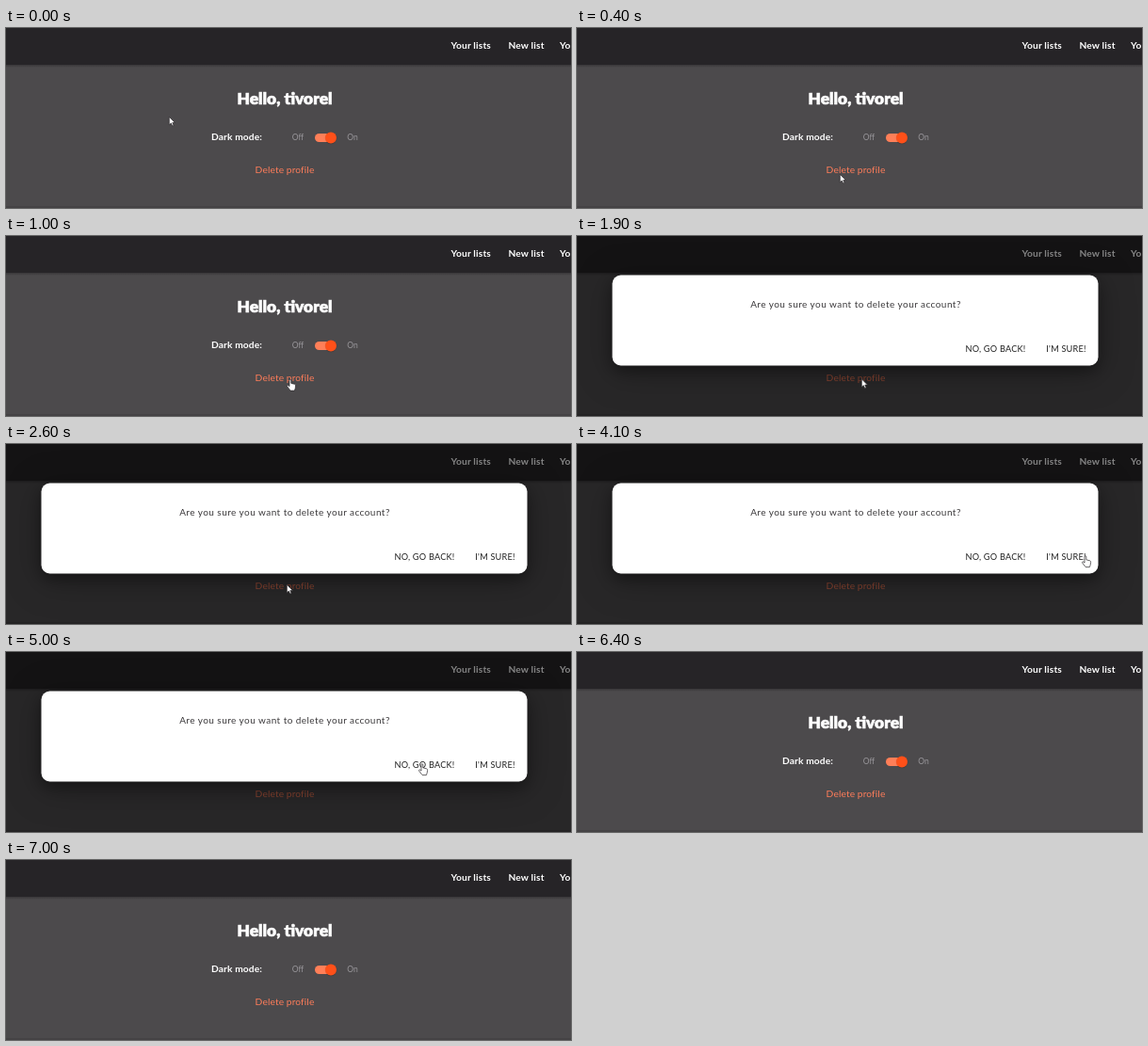
Write an HTML page that moves like this. It is 600x191 px and loops after 7400 ms.

```html
<!DOCTYPE html>
<html lang="en">
<head>
<meta charset="utf-8">
<title>Profile</title>
<style>
  html, body { margin: 0; width: 100%; height: 100%; overflow: hidden; background: #4c4a4c; }
  svg { display: block; width: 600px; height: 191px; }
  text { font: 400 10px Lato, "Open Sans", sans-serif; fill: #fff; }
  .mid { text-anchor: middle; }
  .bold { font-weight: 700; }
  .nav { font-size: 10.2px; letter-spacing: .15px; }
  .title { font-size: 17.4px; font-weight: 900; stroke: #fff; stroke-width: .6px; }
  .label { font-size: 10.2px; letter-spacing: .15px; }
  .state { font-size: 8.5px; fill: #98969a; }
  .delete { font-size: 10.2px; fill: #ff7d5a; letter-spacing: .12px; }
  .card { fill: #fff; filter: drop-shadow(0 6px 8px rgba(0,0,0,.32)) drop-shadow(0 5px 18px rgba(0,0,0,.25)); }
  .ask { fill: #3a383a; letter-spacing: .45px; }
  .button { font-size: 9.2px; fill: #222; letter-spacing: .2px; }
  .pointer { fill: #fff; stroke: #2a282a; stroke-width: .7px; stroke-linejoin: round; }
  .beam { fill: none; stroke: #333; stroke-width: .9px; }
</style>
</head>
<body>
<svg viewBox="0 0 600 191">
  <defs>
    <linearGradient id="fade" x2="0" y2="1">
      <stop stop-color="#262427" stop-opacity=".5"/>
      <stop offset="1" stop-color="#262427" stop-opacity="0"/>
    </linearGradient>
  </defs>
  <rect width="600" height="191" fill="#4c4a4c"/>
  <rect y="189" width="600" height="2" fill="#444244"/>
  <rect width="600" height="39" fill="#262427"/>
  <rect y="39" width="600" height="3" fill="url(#fade)"/>

  <text class="bold nav" x="472.5" y="21.6">Your lists</text>
  <text class="bold nav" x="533.5" y="21.6">New list</text>
  <text class="bold nav" x="588" y="21.6">Yo</text>

  <text class="title mid" x="296" y="81">Hello, tivorel</text>
  <text class="bold label mid" x="245" y="118.8">Dark mode:</text>
  <text class="state mid" x="310" y="119">Off</text>
  <text class="state mid" x="368" y="119">On</text>
  <rect x="328" y="112" width="21" height="9" rx="4.5" fill="#ff7f58"/>
  <circle cx="345" cy="117" r="6.3" opacity=".15"/>
  <circle cx="345" cy="116.5" r="6" fill="#ff5019"/>
  <text class="delete mid" x="296" y="154">Delete profile</text>

  <g id="dialog" visibility="hidden">
    <rect width="600" height="191" opacity=".48"/>
    <rect class="card" x="37.5" y="41.5" width="516" height="96" rx="9"/>
    <text class="ask mid" x="296" y="76">Are you sure you want to delete your account?</text>
    <text class="button mid" x="444.5" y="123">NO, GO BACK!</text>
    <text class="button mid" x="519.5" y="123">I'M SURE!</text>
  </g>

  <g id="cursor">
    <path id="arrow" class="pointer" d="M.3 .3V8.8L2.3 7L3.7 10L5.1 9.4L3.8 6.5H6.5Z"/>
    <path id="hand" class="pointer" d="M3 1.2Q3.9 .2 4.8 1.2V4.8L8.6 5.8Q9.7 6.2 9.6 7.4L9.2 10.2L8.4 12.6H4.1L.7 8.2Q.2 7 1.4 6.8L3 8.1Z"/>
    <path id="beam" class="beam" d="M.5 .5Q2 .5 2 1.5Q2 .5 3.5 .5M2 1.5V8M.5 9Q2 9 2 8Q2 9 3.5 9"/>
  </g>
</svg>
<script>
  const LOOP = 7400, STEP = 100, OPEN = 1900, CLOSE = 6400;
  const $ = id => document.getElementById(id);
  const shapes = ["arrow", "hand", "beam"];

  // time, x, y, shape: each pose holds until the next
  const poses = [
    [0, 173, 94, "arrow"],
    [100, 180, 99, "arrow"],
    [200, 207, 116, "arrow"],
    [300, 246, 139, "arrow"],
    [400, 279, 155, "arrow"],
    [500, 294, 156, "hand"],
    [600, 298, 151.5, "hand"],
    [OPEN, 302, 151.5, "arrow"],
    [2200, 301.5, 151, "arrow"],
    [2600, 298, 149, "arrow"],
    [2700, 304, 136, "arrow"],
    [2800, 321, 111, "arrow"],
    [2900, 340, 86, "arrow"],
    [3000, 353, 69, "beam"],
    [3100, 356, 64, "beam"],
    [4000, 470, 96, "arrow"],
    [4100, 536, 118, "hand"],
    [CLOSE, 0, 0, ""]
  ];

  const ease = p => p * p * (3 - 2 * p);

  function poseAt(t) {
    const pose = poses.filter(p => p[0] <= t).pop().slice();
    if (t >= 4400 && t < CLOSE) {
      const tick = Math.floor((t - 4400) / STEP) + 1;
      pose[1] -= 98 * ease(Math.min(1, tick / 7));
    }
    return pose;
  }

  function draw(now) {
    const t = now % LOOP;
    const [, x, y, shape] = poseAt(t);
    $("dialog").setAttribute("visibility", t >= OPEN && t < CLOSE ? "visible" : "hidden");
    $("cursor").setAttribute("transform", `translate(${x} ${y})`);
    for (const s of shapes) $(s).setAttribute("visibility", s === shape ? "visible" : "hidden");
  }

  const start = performance.now();
  function tick() {
    draw(performance.now() - start);
    requestAnimationFrame(tick);
  }
  tick();
</script>
</body>
</html>
```
